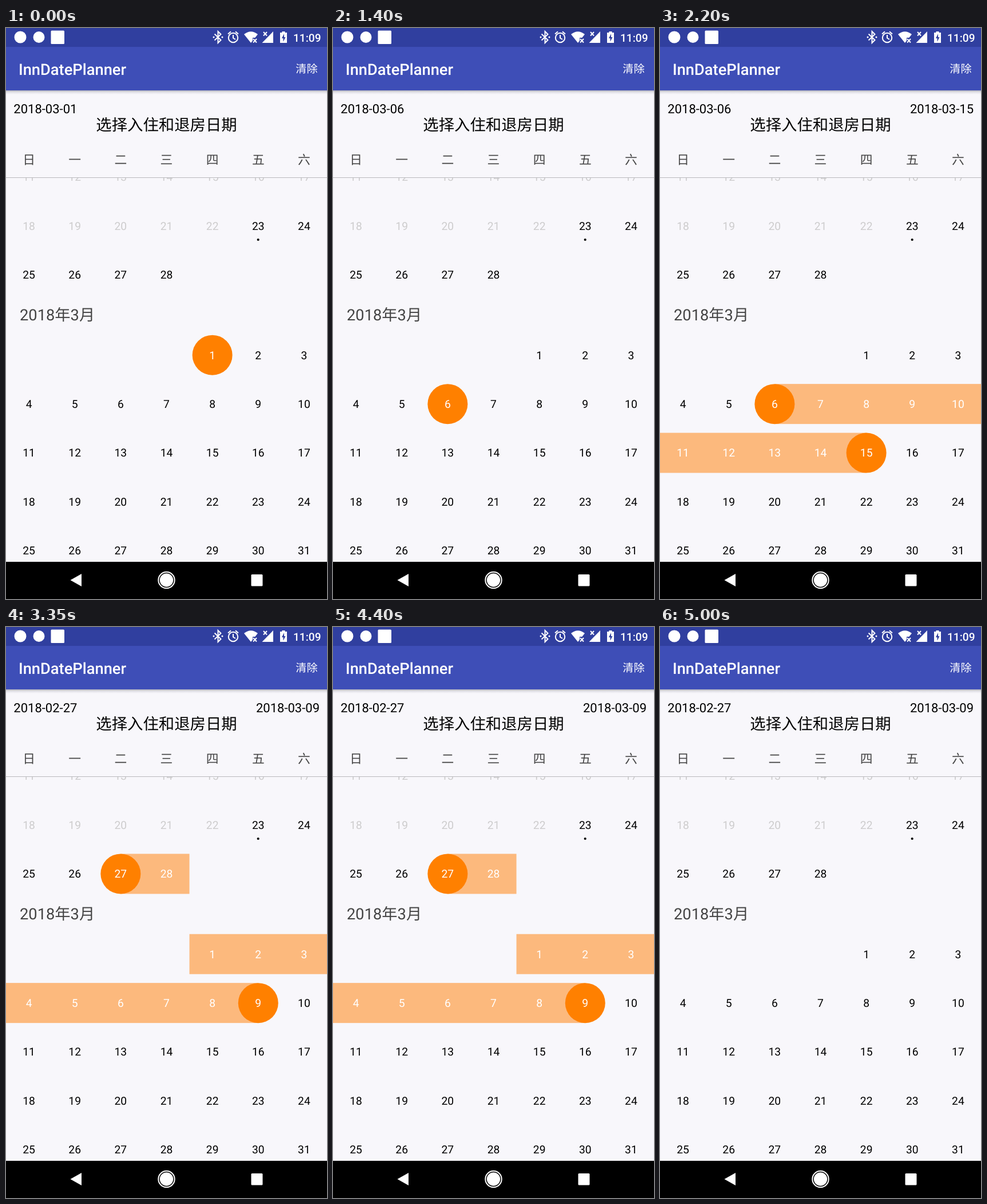
Animation of 561x998 px, one loop 5050 ms. Source, as an HTML page:

```html
<!DOCTYPE html>
<html lang="zh-CN">
<head>
<meta charset="utf-8">
<title>Date range picker</title>
<style>
html, body { margin: 0; width: 100%; height: 100%; overflow: hidden; background: #f8f7fb; }
svg { display: block; width: 561px; height: 998px; }
text { font-family: Roboto, "Noto Sans CJK SC", "Noto Sans CJK", sans-serif; text-rendering: geometricPrecision; }
.mid { text-anchor: middle; }
.end { text-anchor: end; }
.line { fill: none; stroke: #fff; stroke-width: 2; }
</style>
</head>
<body>
<svg viewBox="0 0 561 998" xmlns="http://www.w3.org/2000/svg">
  <defs>
    <linearGradient id="shade" x2="0" y2="1">
      <stop offset="0" stop-color="#6a6a78" stop-opacity=".5"/>
      <stop offset=".45" stop-color="#8a8a98" stop-opacity=".2"/>
      <stop offset="1" stop-color="#8a8a98" stop-opacity="0"/>
    </linearGradient>
    <clipPath id="list"><path d="M0 262H561V933H0z"/></clipPath>
  </defs>
  <rect width="561" height="998" fill="#f8f7fb"/>

  <g clip-path="url(#list)">
    <g id="marks"></g>
    <g id="days" class="mid" font-size="19.3"></g>
    <circle cx="440.7" cy="370" r="2.1"/>
    <text x="24" y="511" font-size="27.27" fill="#444">2018年3月</text>
  </g>

  <path d="M0 261.5H561" stroke="#b9b9bd"/>
  <g id="week" class="mid" font-size="21.8" fill="#444"></g>
  <text id="from" x="13.3" y="149.3" font-size="22"></text>
  <text id="to" class="end" x="548" y="149.3" font-size="22"></text>
  <text class="mid" x="280.5" y="179.2" font-size="27.4">选择入住和退房日期</text>

  <rect y="109" width="561" height="7" fill="url(#shade)"/>
  <rect y="32" width="561" height="77" fill="#3e4eb7"/>
  <rect width="561" height="33" fill="#303f9f"/>
  <text x="22" y="81.5" font-size="27.27" font-weight="500" fill="#fff">InnDatePlanner</text>
  <text class="end" x="544.5" y="77.8" font-size="19.1" fill="#fff">清除</text>

  <g fill="#fff">
    <circle cx="25" cy="16" r="10.5"/>
    <circle cx="57.5" cy="16" r="10"/>
    <rect x="78.5" y="4.5" width="23.5" height="23.5" rx="1.5"/>
    <path class="line" d="M364.5 10.5l11 10.5-5 5V6l5 5-11 10.500"/>
    <circle cx="363" cy="16" r="1.5"/><circle cx="378" cy="16" r="1.5"/>
    <circle class="line" cx="397" cy="17" r="8.200"/>
    <path class="line" d="M397 12v5.500l4 2.500M388 10.500l5-4.300M406 10.500l-5-4.300"/>
    <path d="M416 11Q428 1.500 440 11L428 26z"/>
    <path d="M467 6v20h-19.500z"/>
    <path d="M482.500 6h5v2h3.500v18h-12V8h3.500z"/>
  </g>
  <path d="M431 17h10v10h-10z" fill="#303f9f"/>
  <path class="line" d="M432 19l6 6.500M438 19l-6 6.500M450 7l6 6.500M456 7l-6 6.500"/>
  <path d="M486 10l-4 8h2.500v6l4-8H486z" fill="#303f9f"/>
  <text class="end" x="550.5" y="24" font-size="19.1" font-weight="500" fill="#fff">11:09</text>

  <rect y="933" width="561" height="65"/>
  <path d="M112.500 965L132 954v22z" fill="#fff"/>
  <circle cx="280.500" cy="965" r="11.700" fill="#fff"/>
  <circle class="line" cx="280.500" cy="965" r="14.200" stroke-width="1.700"/>
  <rect x="428.500" y="955" width="20" height="20.500" rx="1.500" fill="#fff"/>
</svg>
<script>
const LOOP = 5050, COL = 561 / 7, PITCH = 85.43, RADIUS = 35;
const FEB = 28, TODAY = 23, FIRST = 11;

// Days count on from February 1; March 1 is 29.
// [start ms, first day, last day, highlighted]
const steps = [
  [0, 29, 0, true],
  [650, 29, 43, true],
  [1400, 34, 0, true],
  [2200, 34, 43, true],
  [2750, 27, 0, true],
  [3350, 27, 37, true],
  [4650, 27, 37, false]
];

const byId = id => document.getElementById(id);
const add = (parent, tag, attrs, text = '') => {
  const el = document.createElementNS('http://www.w3.org/2000/svg', tag);
  for (const key in attrs) el.setAttribute(key, attrs[key]);
  el.textContent = text;
  return parent.appendChild(el);
};
const center = col => (col + .5) * COL;
const dateText = n => {
  if (!n) return '';
  const march = n > FEB, day = march ? n - FEB : n;
  return `2018-0${march ? 3 : 2}-${String(day).padStart(2, '0')}`;
};

[...'日一二三四五六'].forEach((s, i) => add(byId('week'), 'text', { x: center(i), y: 238 }, s));

const rows = [], cells = [];
for (let n = FIRST; n <= FEB + 31; n++) {
  const march = n > FEB, col = (n - FIRST) % 7;
  if (!col || n === FEB + 1) {
    const y = n === FEB + 1 ? 571.7 : rows.length ? rows.at(-1).y + PITCH : 260.6;
    rows.push({ y, days: [] });
  }
  const row = rows.at(-1), day = march ? n - FEB : n;
  const el = add(byId('days'), 'text', { x: center(col), y: row.y + 6.8 }, day);
  const cell = { n, col, el, y: row.y };
  row.days.push(cell);
  cells.push(cell);
}

function render([, a, b, shown]) {
  const marks = byId('marks'), last = b || a;
  const inside = n => shown && n >= a && n <= last;
  marks.replaceChildren();
  byId('from').textContent = dateText(a);
  byId('to').textContent = dateText(b);

  for (const { y, days } of rows) {
    const hit = days.filter(d => inside(d.n));
    if (!hit.length || !b) continue;
    const start = hit[0], stop = hit.at(-1);
    const x0 = (start.col + (start.n === a ? .5 : 0)) * COL;
    const x1 = (stop.col + (stop.n === b ? .5 : 1)) * COL;
    add(marks, 'rect', { x: x0, y: y - RADIUS, width: x1 - x0, height: 2 * RADIUS, fill: '#fcb97d' });
  }
  for (const { n, col, el, y } of cells) {
    if (shown && (n === a || n === b)) {
      add(marks, 'circle', { cx: center(col), cy: y, r: RADIUS, fill: '#ff8000' });
    }
    el.setAttribute('fill', inside(n) ? '#fff' : n < TODAY ? '#cdcccd' : '#000');
  }
}

let current;
const began = performance.now();
function tick() {
  const t = (performance.now() - began) % LOOP;
  const step = steps.findLast(s => t >= s[0]);
  if (step !== current) render(current = step);
  requestAnimationFrame(tick);
}
tick();
</script>
</body>
</html>
```
